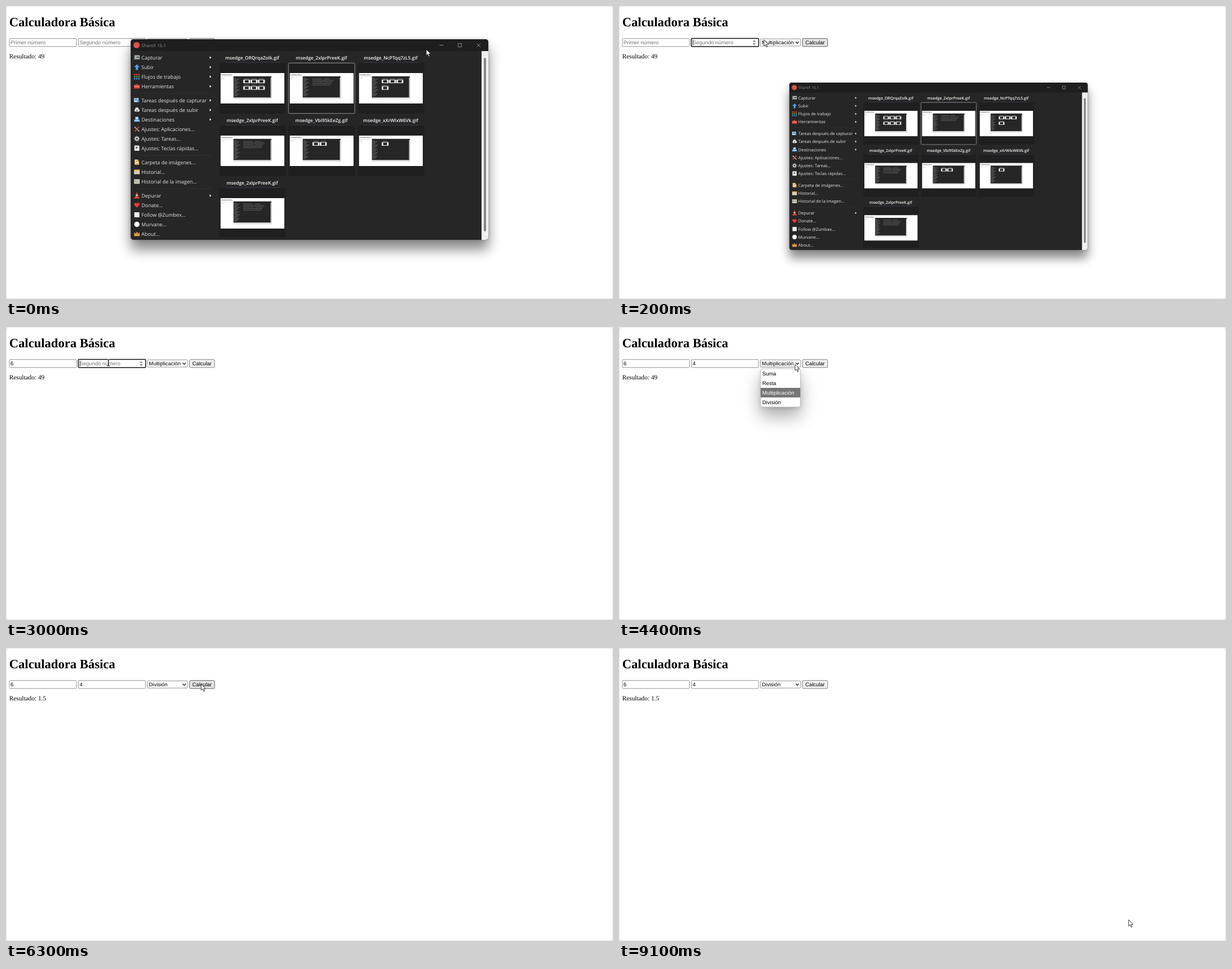
These frames come from a looping animation (1076x520 px, 9.2 s). An HTML page:

```html
<!DOCTYPE html>
<html lang="es">
<head>
<meta charset="utf-8">
<title>Calculadora Básica</title>
<style>
html, body { margin: 0; width: 100%; height: 100%; overflow: hidden; background: #eee; }
svg { display: block; }
text { white-space: pre; text-rendering: geometricPrecision; }
.serif { font-family: "Liberation Serif", serif; font-size: 11.32px; }
.form { font-family: "Liberation Sans", sans-serif; font-size: 9.43px; }
.ui { font-family: "Open Sans", "Noto Sans", sans-serif; font-size: 9px; fill: #e4e4e4; }
.name { font-size: 8.3px; font-weight: 600; fill: #f4f4f4; text-anchor: middle; }
.shadow { filter: drop-shadow(0 0 3px #0003) drop-shadow(0 17px 11px #0007); }
.listShadow { filter: drop-shadow(0 2px 4px #0002) drop-shadow(0 16px 15px #0005); }
</style>
</head>
<body>
<svg id="stage" width="1076" height="520" viewBox="0 0 1076 520">
  <rect x=".5" y=".5" width="1075" height="519" rx="6" fill="#fff" stroke="#e6e6e6"/>
  <text x="5.7" y="36.2" class="serif" style="font-size:22.64px;font-weight:bold">Calculadora Básica</text>
  <g id="form"></g>
  <g id="win"></g>
  <g id="cursor"></g>
</svg>
<script>
const LOOP = 9200, STEP = 100;
const $ = id => document.getElementById(id);
const rect = (x, y, w, h, fill, extra = '') =>
  `<rect x="${x}" y="${y}" width="${w}" height="${h}" fill="${fill}" ${extra}/>`;
const path = (d, fill, extra = '') => `<path d="${d}" fill="${fill}" ${extra}/>`;
const line = (d, color, width = 1) => path(d, 'none', `stroke="${color}" stroke-width="${width}"`);
const dot = (x, y, r, fill) => `<circle cx="${x}" cy="${y}" r="${r}" fill="${fill}"/>`;
const text = (x, y, s, cls, extra = '') => `<text x="${x}" y="${y}" class="${cls}" ${extra}>${s}</text>`;

// Menu icons, each in a 10 by 10 box
const table = rect(0, 1, 10, 8, '#e8e0cc') + rect(0, 1, 10, 2, '#e0a23c');
const icons = {
  camera: rect(0, 1, 10, 7, '#b9bec4') + rect(0, 1, 2, 8, '#777') + rect(4, 3, 5, 3, '#566'),
  up: path('M5 0L10 5H7V10H3V5H0Z', '#4f9fe6'),
  grid: [0, 1, 2].map(r => [0, 1, 2].map(c =>
    rect(c * 3.7, r * 3.7, 2.4, 2.4, ['#e0453c', '#4caf58', '#4a8fe0'][r])).join('')).join(''),
  box: rect(3, 1, 4, 3, '#a33') + rect(0, 2.5, 10, 6.5, '#dd3f38') + rect(0, 5, 10, 1, '#fbb'),
  picture: rect(0, 1, 8, 7, '#e3edf5') + rect(1, 2, 6, 4, '#55a5df') + path('M6 4L10 7L6 9Z', '#4b9bea'),
  cloud: path('M2 8A2.6 2.6 0 0 1 2 3.5A3 3 0 0 1 8 3.5A2.4 2.4 0 0 1 8.5 8Z', '#e7ebee') + path('M5 4L7 7H3Z', '#667'),
  drive: path('M2 0H8V5H10V9H0V5H2Z', '#5b9bdc') + rect(3, 1, 4, 3, '#dcecfa') + rect(1, 6, 8, 1.5, '#cde'),
  tools: line('M1 1L9 9', '#cfcfcf', 1.6) + line('M9 1L1 9', '#d8503f', 1.7),
  gear: dot(5, 5, 3.3, '#ccc') + line('M5 0V10M0 5H10M1.6 1.6L8.4 8.4M8.4 1.6L1.6 8.4', '#ccc', 1.4) + dot(5, 5, 1.5, '#333'),
  key: rect(.5, 0, 9, 9.5, '#e8e8e8', 'rx="1"') + rect(3, 2.5, 3, 3, '#666'),
  folder: rect(1, 0, 6, 9, '#f3d58b') + rect(3, 2, 6, 7.5, '#d9a441') + rect(4, 4, 4, 3, '#e9eef3'),
  history: table + line('M1 5H9M1 7H9', '#a98', .7),
  gallery: rect(0, 1, 10, 8, '#dcd9c6') + rect(1, 3, 3.5, 2, '#797') + rect(5.5, 3, 3.5, 2, '#9a8') + rect(1, 6, 8, 1, '#998'),
  cone: path('M4 0H6L8 8H10V10H0V8H2Z', '#d9483b') + rect(3, 3.5, 4, 1.5, '#eee'),
  heart: path('M5 9.5L.7 5C-1.2 2 2.5-.8 5 2C7.5-.8 11.2 2 9.3 5Z', '#e2393d'),
  square: rect(.5, .5, 9, 9, '#ececec'),
  circle: dot(5, 5, 4.7, '#fff'),
  crown: path('M0 2L2.5 4L5 1L7.5 4L10 2V9H0Z', '#c9873c') + rect(1, 6, 8, 1.3, '#f0c36b')
};
const menu = [
  [91.5, 'Capturar>camera', 'Subir>up', 'Flujos de trabajo>grid', 'Herramientas>box'],
  [167.5, 'Tareas después de capturar>picture', 'Tareas después de subir>cloud', 'Destinaciones>drive',
    'Ajustes: Aplicaciones...|tools', 'Ajustes: Tareas...|gear', 'Ajustes: Teclas rápidas...|key'],
  [277.5, 'Carpeta de imágenes...|folder', 'Historial...|history', 'Historial de la imagen...|gallery'],
  [336.5, 'Depurar>cone', 'Donate...|heart', 'Follow @Zumbex...|square', 'Murvane...|circle', 'About...|crown']
];
const menuItem = (item, y) => {
  const [label, icon] = item.split(/[>|]/);
  return `<g transform="translate(227 ${y - 5})">${icons[icon]}</g>` + text(240, y + 3.3, label, 'ui') +
    (item.includes('>') ? path(`M361 ${y - 2.2}l2.8 2.2l-2.8 2.2Z`, '#fff') : '');
};
const menuGroup = ([top, ...items], i) =>
  (i ? line(`M227 ${top - 12.5}H366`, '#303030') : '') +
  items.map((item, k) => menuItem(item, top + k * 17)).join('');

// File name and number of small previews; 0 stands for a list
const files = [['ORQrqaZolk', 6], ['2xlprPreeK', 0], ['NcPTqq7zL5', 4], ['2xlprPreeK', 0],
  ['Vbi95kEeZg', 2], ['xXrWlxW6Vk', 1], ['2xlprPreeK', 0]];

function miniPage(x, y, count) {
  let s = rect(x, y, 113, 54, '#fff') +
    text(x + 1, y + 4, 'Calculadora Básica', 'serif', 'style="font-size:2.4px;font-weight:bold"') +
    line(`M${x + 1} ${y + 6.5}h37`, '#ccc', .6) + line(`M${x + 1} ${y + 9.2}h6`, '#aaa', .6) +
    rect(x + 22, y + 8, 69, 39, '#0001', 'rx="2"') + rect(x + 22.5, y + 7, 68, 37.5, '#0002', 'rx="1"') +
    rect(x + 23, y + 5.7, 67, 37.5, '#262626', 'rx=".6"') + rect(x + 88.7, y + 8, 1.3, 35, '#e5e5e5');
  for (let i = 0; i < 18; i++)
    s += rect(x + 24, y + 8.8 + i * 1.85, 4 + i * 5 % 7, .7, '#777');
  for (let i = 0; i < count; i++) {
    const px = x + 40.3 + i % 3 * 13, py = y + 11.7 + (i / 3 | 0) * 11.7;
    s += rect(px + 1.5, py - 2, 9, .7, '#999') + rect(px, py, 12, 6.2, '#fff') + rect(px + 2.5, py + .9, 7, 4.3, '#222');
  }
  for (let i = 0; !count && i < 5; i++)
    s += rect(x + 40, y + 10 + i * 2.7, 17 + i * 5 % 8, .7, '#777') + rect(x + 61, y + 10 + i * 2.7, 10 + i * 7 % 9, .7, '#777');
  return s;
}
function thumb([name, count], i) {
  const x = 378 + i % 3 * 122.7, y = 101 + (i / 3 | 0) * 111;
  return text(x + 58.5, y - 5.8, `msedge_${name}.gif`, 'ui name') +
    rect(x, y, 118, Math.min(90, 411 - y), '#1f1f1f', 'rx="2"') +
    line(`M${x + 10} ${y - .5}h98`, '#353b52', .8) +
    miniPage(x + 2.4, y + 18, count) +
    (i === 1 ? rect(x, y + .2, 117.6, 89.5, 'none', 'rx="2" stroke="#a0a0a0" stroke-width=".9"') : '');
}
$('win').innerHTML =
  rect(221, 59, 634, 356, '#262626', 'rx="5" class="shadow"') +
  path('M221 80V64a5 5 0 0 1 5-5H850a5 5 0 0 1 5 5V80Z', '#1e1e1e') +
  dot(231.5, 69.5, 5.5, '#d9534a') +
  text(240, 72.7, 'ShareX 16.1', 'ui', 'style="font-size:8px;fill:#8a8a8a"') +
  line('M768.5 69.5h7M801.5 66.5h6v6h-6ZM834.5 66.5l6.5 6.5M841 66.5l-6.5 6.5', '#9a9a9a', .9) +
  path('M843 80H855V410a5 5 0 0 1-5 5H843Z', '#f0f0f0') +
  rect(847, 92, 4, 308, '#858585', 'rx="2"') +
  menu.map(menuGroup).join('') + files.map(thumb).join('');

const spinner = x => path(`M${x - 2.8} 63.6h5.6l-2.8-3.4ZM${x - 2.8} 66h5.6l-2.8 3.4Z`, '#858585');
function field(x, value, hint, focus, hover, caret) {
  return (focus
    ? rect(x - .3, 57.5, 119.4, 14.6, '#fff', 'rx="1.5" stroke="#101010" stroke-width="1.5"')
    : rect(x, 57.7, 118.9, 14.2, '#fff', 'rx="1.5" stroke="#767676" stroke-width=".8"')) +
    text(x + 2, 67.7, value || hint, 'form', `fill="${value ? '#000' : '#757575'}"`) +
    (focus || hover ? spinner(x + 111.3) : '') +
    (focus && caret ? line(`M${x + (value ? 8 : 2.6)} 59.5v10.5`, '#000', .8) : '');
}
function dropdown(active) {
  return rect(251, 74, 70.5, 68, '#fff', 'rx="4" class="listShadow"') +
    (active === 3 ? path('M251 125H321.5V138a4 4 0 0 1-4 4H255a4 4 0 0 1-4-4Z', '#757575')
      : rect(251, 74 + active * 17, 70.5, 17, '#757575')) +
    ['Suma', 'Resta', 'Multiplicación', 'División'].map((s, i) =>
      text(254, 85.7 + i * 17, s, 'form', `fill="${i === active ? '#fff' : '#000'}"`)).join('') +
    rect(251, 74, 70.5, 68, 'none', 'rx="4" stroke="#aaa" stroke-width=".6"');
}

// Pointer stops: time, x, y, shape (a arrow, i text bar, - hidden)
const stops = [
  [0, 745, 77, 'a'], [100, 772, 69, 'a'], [200, 257, 60, 'a'], [300, 170, 64, 'i'], [500, 76, 32, 'i'],
  [800, 70, 42, 'i'], [1000, 66, 59, 'i'], [1100, 65.5, 60, 'i'], [1200, 65.5, 60, 'i'], [1400, 76, 30, 'i'],
  [1700, 76, 30, '-'], [2100, 76, 34, 'i'], [2600, 178, 62, 'i'], [3000, 181.5, 63.5, 'i'],
  [3600, 181.5, 63.5, 'i'], [3900, 270, 54, 'a'], [4200, 312, 66, 'a'], [4700, 312, 67, 'a'],
  [5300, 299, 137, 'a'], [5500, 299, 137, 'a'], [5900, 346, 64, 'a'], [7000, 346, 64, 'a'],
  [7100, 346, 83, 'a'], [7300, 346, 83, 'a'], [7600, 125, 202, 'a'], [7800, 200, 235, 'a'],
  [8300, 713, 326, 'a'], [8400, 713, 326, 'a'], [8700, 556, 500, 'a'], [8900, 760, 506, 'a'],
  [9100, 903.5, 482.5, 'a']
];
const arrow = path('M0 0V11L2.5 8.6L4.4 13L6.2 12.2L4.3 8H7.8Z', '#fff', 'stroke="#111" stroke-width=".8"');
const beam = 'M-2.5-5.5H-.7L0-5L.7-5.5H2.5M0-5V5M-2.5 5.5H-.7L0 5L.7 5.5H2.5';
const shapes = { a: arrow, i: line(beam, '#fff', 2) + line(beam, '#000', 1.1), '-': '' };
function pointer(t) {
  const k = stops.findLastIndex(s => s[0] <= t);
  const [t0, x0, y0, shape] = stops[k], [t1, x1, y1] = stops[k + 1] || [LOOP, x0, y0];
  const u = (t - t0) / (t1 - t0);
  return { x: x0 + (x1 - x0) * u, y: y0 + (y1 - y0) * u, shape };
}

function draw(t) {
  const p = pointer(t), within = (a, b) => t >= a && t < b;
  const over = (a, b) => p.shape !== '-' && p.x > a && p.x < b && p.y > 57 && p.y < 72;
  const focus1 = within(1200, 2700), focus2 = within(200, 1200) || within(2700, 4400);
  const hot = t === 200 || over(325, 370), caret = t !== 3200;
  $('form').innerHTML =
    field(6, t >= 1700 ? '6' : '', 'Primer número', focus1, over(6, 125), caret) +
    field(128.4, t >= 3600 ? '4' : '', 'Segundo número', focus2, over(128, 247), caret) +
    rect(250.6, 58.3, 71.3, 12.8, '#fff', 'rx="1.5" stroke="#767676" stroke-width=".8"') +
    text(253.3, 67.7, t >= 5500 ? 'División' : 'Multiplicación', 'form') +
    line('M313.3 63.5l2.7 2.7l2.7-2.7', '#111', 1.3) +
    rect(325.3, 57.7, 44.5, 14.2, t === 6100 ? '#f5f5f5' : hot ? '#e3e3e3' : '#efefef',
      `rx="1.8" stroke="${hot ? '#4f4f4f' : '#767676'}" stroke-width=".9"`) +
    text(330.2, 67.7, 'Calcular', 'form') +
    text(5.7, 93.3, 'Resultado: ' + (t >= 6200 ? '1.5' : '49'), 'serif') +
    (within(4400, 5500) ? dropdown(p.y < 125 ? 2 : 3) : '');
  $('win').setAttribute('display', t < 300 ? 'inline' : 'none');
  $('win').setAttribute('transform', t < 200 ? '' : 'translate(117.7 86.8) scale(.834)');
  $('cursor').innerHTML = shapes[p.shape];
  $('cursor').setAttribute('transform', `translate(${p.x} ${p.y})`);
}

let start, last = -1;
function tick(now) {
  start ??= now;
  const t = Math.floor((now - start) % LOOP / STEP) * STEP;
  if (t !== last) draw(last = t);
  requestAnimationFrame(tick);
}
draw(0);
requestAnimationFrame(tick);
</script>
</body>
</html>
```
